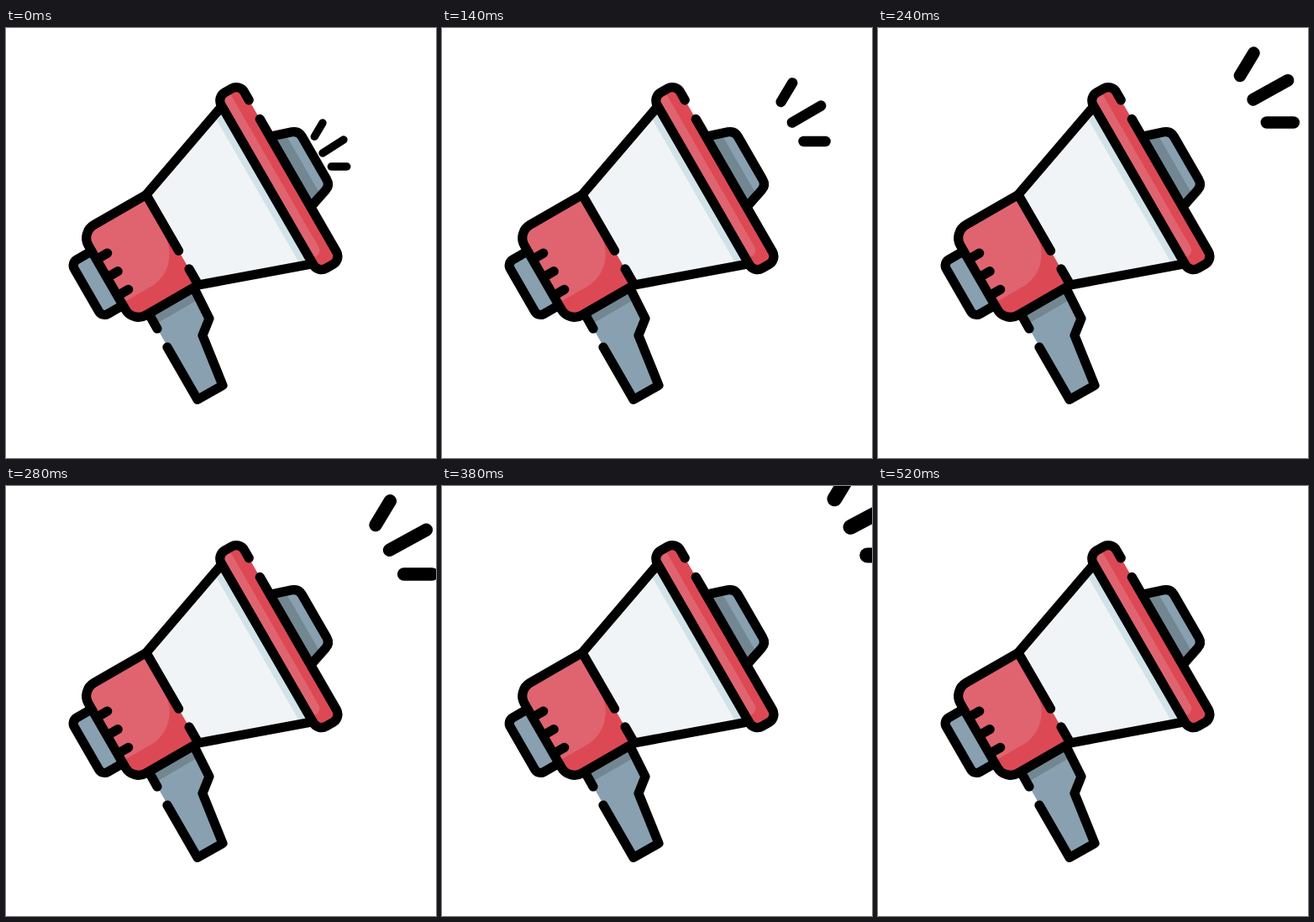
Recreate the animation shown at these times as an HTML page. Size 512x512 px, loop 1 s.

```html
<!DOCTYPE html>
<html lang="en">
<head>
<meta charset="utf-8">
<title>Megaphone</title>
<style>
  html, body { margin: 0; width: 100%; height: 100%; overflow: hidden; background: #fff; }
  svg { display: block; width: 100vw; height: 100vh; }
  .ink { fill: none; stroke: #000; stroke-width: 11.2; stroke-linecap: round; stroke-linejoin: round; }
  .red { fill: #dc4955; }
  .pink { fill: #e0646f; }
  .steel { fill: #88a0b0; }
  .slate { fill: #728792; }
</style>
</head>
<body>
<svg viewBox="0 0 512 512">
  <!-- handle -->
  <path class="steel" d="M169 338L228 443L258 426L234 366L242 346L224 310Z"/>
  <path class="slate" d="M169 338L224 310L232 321.5L180 351.5Z"/>
  <path class="ink" d="M180 358L171 342M192 380L228 442.5L258 425.5L234 366L242 346L226 314"/>

  <!-- the rest lies along a tilted axis -->
  <g transform="rotate(-30)">
    <!-- rear cap -->
    <path class="steel" d="M-44.5 281H-65a8 8 0 0 0 -8 8V347.5a8 8 0 0 0 8 8H-44.5Z"/>
    <path class="ink" d="M-48 281H-65a8 8 0 0 0 -8 8V347.5a8 8 0 0 0 8 8H-48"/>

    <!-- front horn -->
    <path class="steel" d="M207.6 269L233 277.5Q240.5 280 240.5 288V347Q240.5 355 233 357.5L207.6 366Z"/>
    <path class="slate" d="M207.6 269L225 275V360L207.6 366Z"/>
    <path class="ink" d="M209 269.5L233 277.5Q240.5 280 240.5 288V347Q240.5 355 233 357.5L209 365.5"/>

    <!-- cone -->
    <path fill="#f1f4f6" d="M45.4 255.4L176 209.3V425.7L45.4 379.5Z"/>
    <path fill="#d1e3e9" d="M162.5 214L176 209.3V425.7L162.5 421Z"/>

    <!-- body -->
    <path class="red" d="M45.4 255.4H-26.5a18 18 0 0 0 -18 18V361.5a18 18 0 0 0 18 18H45.4Z"/>
    <path class="pink" d="M40 255.4H-26.5a18 18 0 0 0 -18 18V353H-5a45 45 0 0 0 45 -45Z"/>
    <path class="ink" d="M45.4 332.5V255.4H-26.5a18 18 0 0 0 -18 18V361.5a18 18 0 0 0 18 18H45.4V357.5
      M-44.5 292.5h15M-44.5 317.5h15M-44.5 342.5h15"/>
    <path class="ink" d="M45.4 255.4L176 209.3M45.4 379.5L176 425.7"/>

    <!-- rim -->
    <path class="red" d="M207.6 207.7a11 11 0 0 0 -11 -11H187a11 11 0 0 0 -11 11V427.4a11 11 0 0 0 11 11H196.6a11 11 0 0 0 11 -11Z"/>
    <path class="pink" d="M192 196.7H187a11 11 0 0 0 -11 11V420H184a8 8 0 0 0 8 -8Z"/>
    <path class="ink" d="M207.6 219V207.7a11 11 0 0 0 -11 -11H187a11 11 0 0 0 -11 11V427.4a11 11 0 0 0 11 11H196.6a11 11 0 0 0 11 -11V245"/>
  </g>

  <g id="rays" class="ink"></g>
</svg>
<script>
  const LOOP = 1000, LAST = 15;
  const rays = document.getElementById('rays');

  // Each end: x, y, then its drift per step
  const ends = [
    [[367.3, 129.3, 9.1, -10.35], [377, 113, 10.05, -11.9]],
    [[377, 149, 9.95, -9.1], [402, 133, 12.3, -10.1]],
    [[387.3, 165, 10.8, -7.5], [405.8, 165, 12.7, -7.5]]
  ];

  // Steps last 40, 40 and 20 ms in turn
  function stepAt(t) {
    const u = t + 80, r = u % 100;
    const part = r < 20 ? 0 : r < 60 ? 1 : 2;
    return Math.max(0, 3 * Math.floor(u / 100) - 3 + part);
  }

  const lines = ends.map(() =>
    rays.appendChild(document.createElementNS('http://www.w3.org/2000/svg', 'path')));

  function draw(t) {
    const n = stepAt(t);
    const at = ([x, y, dx, dy]) => `${x + dx * n} ${y + dy * n}`;
    // Once out of view, the rays rest until the loop restarts
    rays.style.display = n < LAST ? '' : 'none';
    rays.style.strokeWidth = 9.4 + 0.76 * n;
    lines.forEach((line, i) => line.setAttribute('d', `M${at(ends[i][0])}L${at(ends[i][1])}`));
  }

  const start = performance.now();
  function tick() {
    draw((performance.now() - start) % LOOP);
    requestAnimationFrame(tick);
  }
  tick();
</script>
</body>
</html>
```
